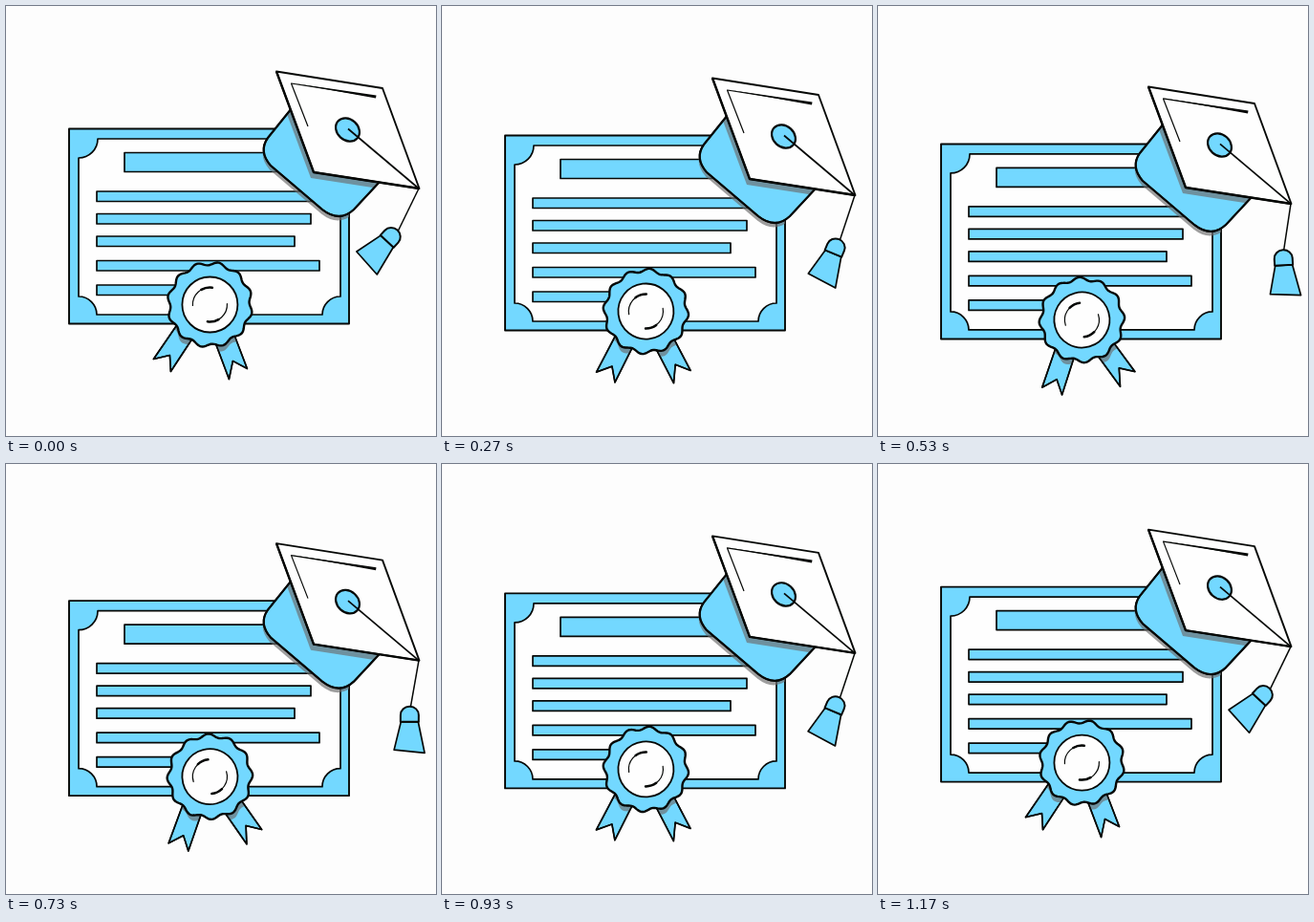
Write an HTML page that moves like this. It is 450x450 px and loops after 1200 ms.

```html
<!DOCTYPE html>
<html lang="en">
<head>
<meta charset="utf-8">
<title>Diploma</title>
<style>
  html, body { margin: 0; width: 100%; height: 100%; overflow: hidden; background: #fdfdfd; }
  svg { display: block; width: 100vw; height: 100vh; }
  .blue { fill: #73d8ff; }
  .paper { fill: #fefefe; }
  .line { fill: none; }
  .shade { fill: #6c6c6c; fill-opacity: .65; stroke: none; }
</style>
</head>
<body>
<svg viewBox="0 0 450 450" stroke="#060806" stroke-width="1.7" stroke-linejoin="round">
  <defs>
    <path id="cap" d="M299 107L274 138Q264 152 277 167L331 213Q349 227 364 213L391 184Z"/>
    <path id="ribbons" d="M-35 22L-59 57L-42 53L-41 70L-18 35ZM5 38L20 78L24 59L39 67L26 33Z"/>
    <path id="rosette"/>
    <clipPath id="onPaper"><rect x="66" y="128" width="293" height="205"/></clipPath>
    <clipPath id="onCap"><use href="#cap"/></clipPath>
    <clipPath id="onRibbons"><use href="#ribbons"/></clipPath>
  </defs>

  <g id="scene">
    <rect class="blue" x="66" y="128.5" width="293" height="204" stroke-width="1.9"/>
    <path class="paper" d="M96 139H331A19 19 0 0 0 350 158V304A19 19 0 0 0 331 323H95A19 19 0 0 0 76 304V159A20 20 0 0 0 96 139Z"/>
    <g id="bars" class="blue"></g>

    <g id="badge">
      <use href="#ribbons" class="blue"/>
      <g clip-path="url(#onRibbons)"><use href="#rosette" class="shade" y="6"/></g>
      <use href="#ribbons" class="line" stroke-width="1.4"/>
      <use href="#rosette" class="blue" stroke-width="2.4"/>
      <circle class="paper" r="29" stroke-width="1.8"/>
      <g class="line" stroke-linecap="round">
        <path id="gleam" stroke-width="1.2" d="M-18 1A18 18 0 0 1 2.500 -17.800"/>
        <path id="gleamEnd" stroke-width="2.5" d="M-9 -15.600A18 18 0 0 1 2.500 -17.800"/>
        <use href="#gleam" transform="rotate(180)"/>
        <use href="#gleamEnd" transform="rotate(180)"/>
      </g>
    </g>

    <g clip-path="url(#onPaper)"><use href="#cap" class="shade" x="-1" y="4.5"/></g>
    <use href="#cap" class="blue"/>
    <g clip-path="url(#onCap)"><path class="shade" d="M283 68L279 73L319 180L390 191V174Z"/></g>
    <use href="#cap" class="line" stroke-width="2.2"/>
    <path class="paper" stroke-width="1.9" d="M283 68.5L394 86L432.500 191L322 174Z"/>
    <path class="line" stroke-width="2.4" d="M283 68.5L322 174L432.500 191"/>
    <path class="line" stroke-width="1.2" d="M316 126L298.500 81L387 95"/>
    <path fill="#060806" stroke="none" d="M298.500 80.500L387.500 93.500L387 96.500Z"/>
    <ellipse class="blue" stroke-width="2.2" rx="13.500" ry="11" transform="translate(357.500 129.500) rotate(42)"/>
    <path class="line" d="M358 128.500L432 191"/>

    <g id="string">
      <path class="line" stroke-width="1.5" d="M0 0V49"/>
      <g id="tassel" class="blue">
        <path d="M-9 16L-16 45.500L16 48.500L9 16Z"/>
        <path stroke-width="2" d="M-9.500 16V9A9.500 9 0 0 1 9.500 9V16Z"/>
      </g>
    </g>
  </g>
</svg>
<script>
const PERIOD = 1200;
const el = id => document.getElementById(id);
const place = (id, value) => el(id).setAttribute('transform', value);

// x, y, width, height
const bars = [
  [124, 153.5, 176, 20], [95, 194, 235, 10.5], [95, 217.5, 224, 10.5],
  [95, 241, 207, 10.5], [95, 266.5, 233, 10.5], [95, 292, 85, 10.5]
];
el('bars').innerHTML = bars.map(([x, y, w, h]) =>
  `<rect x="${x}" y="${y}" width="${w}" height="${h}"/>`).join('');

// Twelve soft scallops
const rim = Array.from({ length: 180 }, (_, i) => {
  const a = i * Math.PI / 90;
  const r = 43 + 1.8 * Math.cos(12 * (a - 12 * Math.PI / 180));
  return `${(r * Math.cos(a)).toFixed(2)} ${(r * Math.sin(a)).toFixed(2)}`;
});
el('rosette').setAttribute('d', `M${rim.join('L')}Z`);

function draw(now) {
  const e = (1 - Math.cos(2 * Math.PI * now / PERIOD)) / 2;
  const stringAngle = 26 - 18 * e;
  const tasselAngle = 43 - 48 * e;
  place('scene', `translate(0 ${16.5 * e})`);
  place('badge', `translate(213.4 312.5) rotate(${-16 * e})`);
  place('string', `translate(432 191) rotate(${stringAngle})`);
  place('tassel', `translate(-1 49) rotate(${tasselAngle - stringAngle})`);
  requestAnimationFrame(() => draw(performance.now()));
}
draw(0);
</script>
</body>
</html>
```
